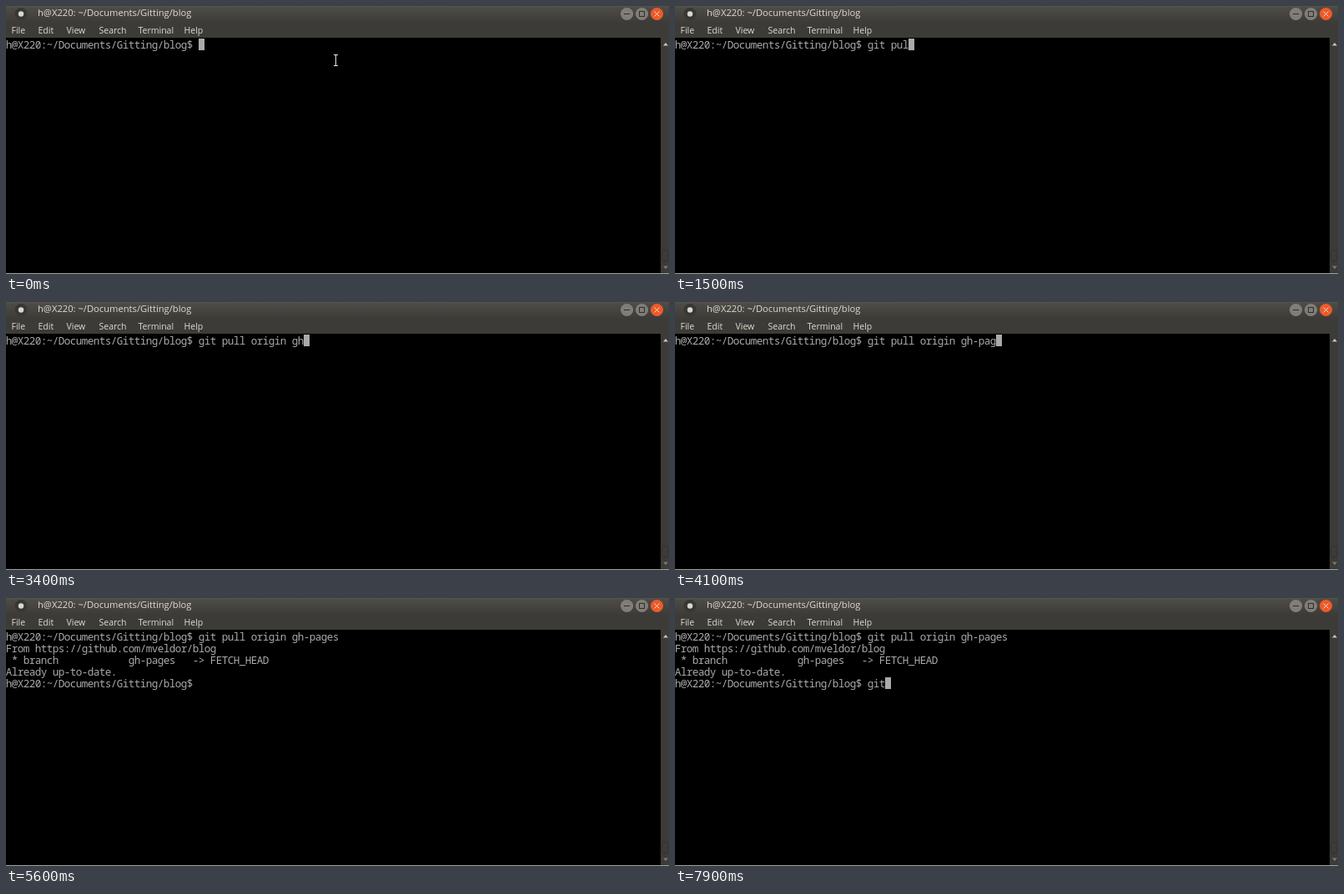
These frames come from a looping animation (795 by 321 pixels, 8 s). An HTML page with a canvas:

```html
<!DOCTYPE html>
<html lang="en">
<head>
<meta charset="utf-8">
<title>Terminal</title>
<style>
html, body { margin: 0; width: 100%; height: 100%; overflow: hidden; background: #000; }
canvas { display: block; }
</style>
</head>
<body>
<canvas id="stage" width="795" height="321"></canvas>
<script>
const ctx = document.getElementById('stage').getContext('2d', { alpha: false });
const LOOP = 8000, CELL = 7, LINE = 14, TOP = 39;
const GREY = '#aaaaaa', LIGHT = '#dfdbd2', PANEL = '#3c3b37';
const MONO = '12.6px "Noto Sans Mono", "DejaVu Sans Mono", monospace';
const SANS = '"Open Sans", "Noto Sans", sans-serif';

const PATH = 'h@X220: ~/Documents/Gitting/blog';
const PROMPT = PATH.replace(' ', '') + '$ ';
const PULL = 'git pull origin gh-pages';
const PULL_KEYS = [400, 600, 700, 800, 1100, 1300, 1500, 1700, 1900, 2100, 2200, 2300,
  2500, 2500, 2700, 2900, 3200, 3400, 3700, 3900, 4000, 4100, 4200, 4400];
const NEXT = 'git';
const NEXT_KEYS = [7700, 7800, 7900];
const ENTER = 4800, REPLY = 5600;
const BLINKS = [100, 400, 5400, 6000, 6600, 7200];
const OUTPUT = [
  'From https://github.com/mveldor/blog',
  ' * branch            gh-pages   -> FETCH_HEAD',
  'Already up-to-date.'
];

const passed = (times, t) => times.filter(at => at <= t).length;

function rect(x, y, w, h, color) {
  ctx.fillStyle = color;
  ctx.fillRect(x, y, w, h);
}

function disc(x, y, r, fill) {
  ctx.beginPath();
  ctx.arc(x, y, r, 0, Math.PI * 2);
  ctx.fillStyle = fill;
  ctx.fill();
}

function label(text, x, y, size) {
  ctx.font = size + 'px ' + SANS;
  ctx.fillStyle = LIGHT;
  ctx.fillText(text, x, y);
}

function arrow(y, dir, color) {
  ctx.fillStyle = color;
  ctx.beginPath();
  ctx.moveTo(788, y - dir * 1.5);
  ctx.lineTo(794, y - dir * 1.5);
  ctx.lineTo(791, y + dir * 2);
  ctx.fill();
}

function drawButtons() {
  const y = 9.5;
  disc(744.5, y, 7.6, '#807e76');
  disc(762.5, y, 7.6, '#807e76');
  disc(780.5, y, 7.6, '#ec5a29');
  rect(741, 9, 7, 1, '#2f2e2a');
  ctx.lineWidth = 1;
  ctx.strokeStyle = '#2f2e2a';
  ctx.strokeRect(759.5, y - 3, 6, 6);
  ctx.strokeStyle = '#f6dccf';
  ctx.beginPath();
  ctx.moveTo(777.5, y - 3); ctx.lineTo(783.5, y + 3);
  ctx.moveTo(783.5, y - 3); ctx.lineTo(777.5, y + 3);
  ctx.stroke();
}

function drawFrame() {
  const bar = ctx.createLinearGradient(0, 0, 0, 20);
  bar.addColorStop(0, '#55534d');
  bar.addColorStop(0.12, '#4c4b46');
  bar.addColorStop(1, PANEL);
  rect(0, 0, 795, 20, bar);
  rect(0, 20, 795, 18, PANEL);

  disc(18, 9.5, 7.5, '#383733');
  disc(18, 9.5, 3.2, '#d8d7d3');
  label(PATH, 38, 12, 11.2);

  const menu = { File: 6, Edit: 38, View: 72, Search: 111, Terminal: 158, Help: 213 };
  for (const name in menu) label(name, menu[name] + 0.5, 33, 10.5);

  drawButtons();

  rect(785, 38, 10, 282, PANEL);
  ctx.strokeStyle = '#33322f';
  ctx.lineWidth = 1;
  ctx.beginPath();
  ctx.roundRect(786.5, 292.5, 8, 13, 3);
  ctx.stroke();
  arrow(46, -1, '#c9c6be');
  arrow(313, 1, '#7d7b74');
  rect(0, 320, 795, 1, '#a3a29f');
}

function drawLine(text, row) {
  ctx.font = MONO;
  ctx.fillStyle = GREY;
  ctx.textAlign = 'center';
  [...text].forEach((ch, col) => ctx.fillText(ch, (col + 0.5) * CELL, TOP + 12 + row * LINE));
  ctx.textAlign = 'left';
}

function drawPointer() {
  rect(393, 58, 5, 1, '#e6e6e6');
  rect(395, 59, 1, 12, '#e6e6e6');
  rect(393, 71, 5, 1, '#e6e6e6');
}

function draw(t) {
  rect(0, 0, 795, 321, '#000');
  drawFrame();

  const lines = [PROMPT + PULL.slice(0, passed(PULL_KEYS, t))];
  if (t >= REPLY) lines.push(...OUTPUT, PROMPT + NEXT.slice(0, passed(NEXT_KEYS, t)));
  else if (t >= ENTER) lines.push('');
  lines.forEach(drawLine);

  if (passed(BLINKS, t) % 2 === 0) {
    const row = lines.length - 1;
    rect(lines[row].length * CELL, TOP + row * LINE, CELL, LINE, GREY);
  }
  if (t < 400) drawPointer();
}

const start = performance.now();
function tick() {
  draw((performance.now() - start) % LOOP);
  requestAnimationFrame(tick);
}
tick();
</script>
</body>
</html>
```
